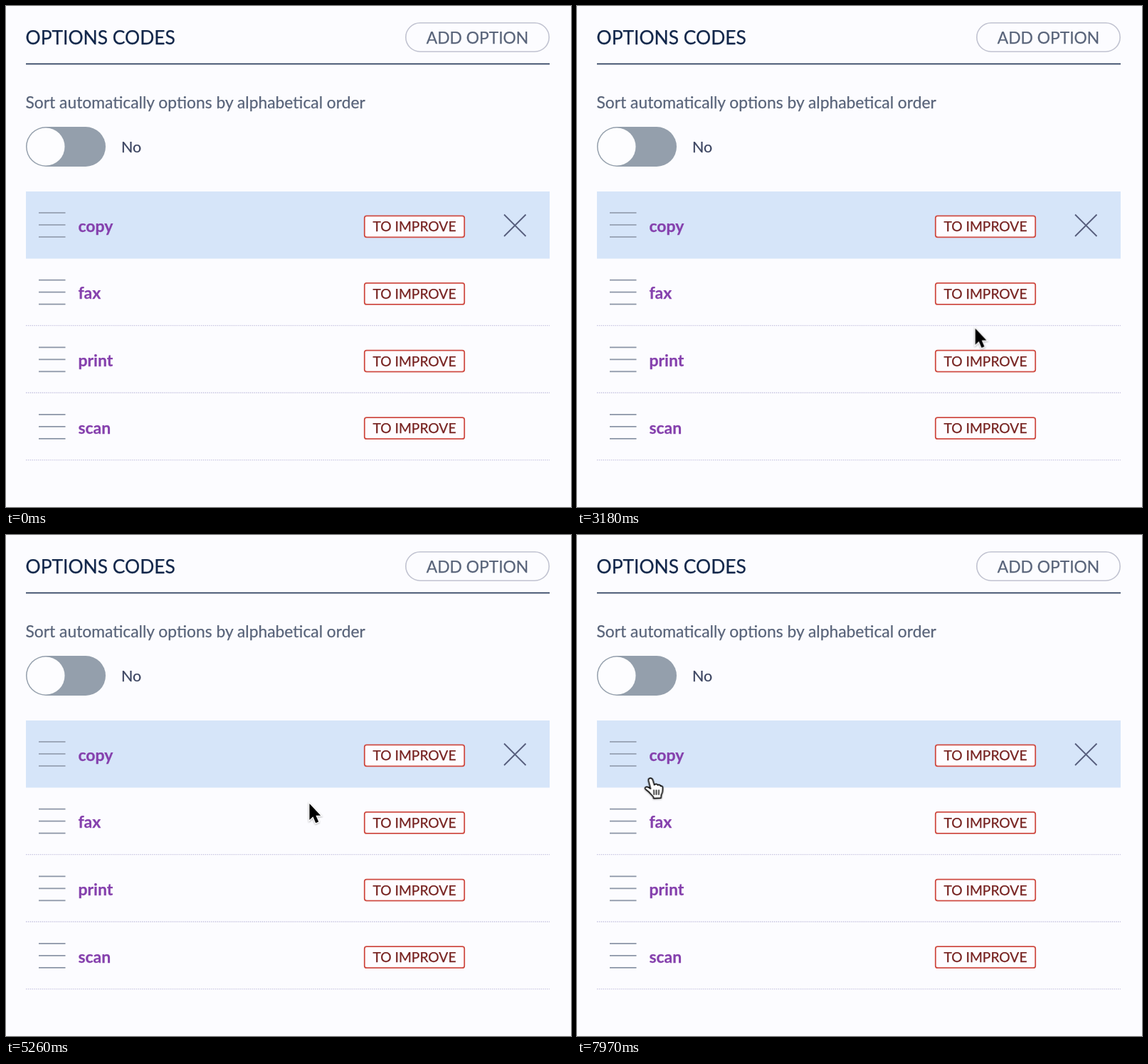
Recreate the animation shown at these times as an HTML page. Size 794 px wide and 705 px high, loop 7990 ms.

```html
<!DOCTYPE html>
<html lang="en">
<head>
<meta charset="utf-8">
<title>Options codes</title>
<style>
  html, body { margin: 0; width: 100%; height: 100%; overflow: hidden; background: #fcfcff; }
  svg { display: block; font-family: Lato, Carlito, sans-serif; }
  text { fill: currentColor; stroke: currentColor; stroke-width: .25; }
  .title { font-size: 26.4px; color: #11264a; }
  .label { font-size: 22.83px; color: #59647a; }
  .state { font-size: 21.4px; color: #3d4662; }
  .code { font-size: 23px; font-weight: 700; color: #8540ad; }
  .badge { font-size: 19.25px; color: #76211f; }
  .grip { stroke: #8b95a6; stroke-width: 1.7; }
  .cross { stroke: #565d7c; stroke-width: 1.8; }
  .rule { stroke: #c6c3e0; stroke-width: 1.4; stroke-dasharray: 1.43; }

  .cursor, .hover, .arrow, .hand { animation: 7990ms infinite; }
  .cursor { animation-name: travel; animation-timing-function: linear;
            filter: drop-shadow(0 1px 1px rgba(0, 0, 0, .3)); }
  .hover, .arrow, .hand { visibility: hidden; animation-timing-function: step-end; }
  .hover { animation-name: hover; }
  .arrow { animation-name: arrow; }
  .hand { animation-name: hand; }

  @keyframes travel {
    0%, 35% { transform: translate(578px, 463px); }
    47.06% { transform: translate(531px, 437px); }
    65.83% { transform: translate(426px, 377px); }
    79.22% { transform: translate(334px, 372px); }
    90.99% { transform: translate(236px, 367px); }
    99.75%, 100% { transform: translate(103.5px, 343px); }
  }
  @keyframes arrow {
    0% { visibility: hidden; }
    35% { visibility: visible; }
    75.7%, 100% { visibility: hidden; }
  }
  @keyframes hand {
    0% { visibility: hidden; }
    75.7%, 100% { visibility: visible; }
  }
  @keyframes hover {
    0% { visibility: hidden; }
    75.7% { visibility: visible; }
    96.6%, 100% { visibility: hidden; }
  }
</style>
</head>
<body>
<svg width="794" height="705" viewBox="0 0 794 705">
  <defs>
    <g id="row">
      <path class="grip" d="M46 30H83.500M46 47H83.500M46 64H83.500"/>
      <rect x="503.800" y="34.300" width="140.400" height="30" rx="3" fill="#fefcff" stroke="#cf4c43" stroke-width="1.800"/>
      <text class="badge" x="574" y="56.300" text-anchor="middle">TO IMPROVE</text>
    </g>
    <path id="cross" class="cross" d="M700 32.500L730.500 63M730.500 32.500L700 63"/>
    <path id="rule" class="rule" d="M28 94H764"/>
  </defs>

  <text class="title" x="27.500" y="54">OPTIONS CODES</text>
  <rect x="561.800" y="23.800" width="201.400" height="40.400" rx="20.200" fill="none" stroke="#c1c3d1" stroke-width="1.600"/>
  <text class="label" x="662.500" y="52.500" text-anchor="middle">ADD OPTION</text>
  <path d="M28 81.500H764" stroke="#14284b" stroke-width="1.700"/>

  <text class="label" x="27.500" y="144">Sort automatically options by alphabetical order</text>
  <rect x="28" y="170" width="112" height="56" rx="28" fill="#949fac"/>
  <circle cx="56" cy="198" r="26.500" fill="#fdfdff"/>
  <text class="state" x="162" y="205.500">No</text>

  <g transform="translate(0 261)">
    <rect x="28" width="736" height="94.500" fill="#d6e5f9"/>
    <use href="#row"/>
    <use href="#cross"/>
    <text class="code" x="101.400" y="56.800">copy</text>
  </g>
  <g transform="translate(0 355.600)">
    <g class="hover">
      <rect x="28" width="736" height="94" fill="#f8f7fe"/>
      <use href="#cross"/>
    </g>
    <use href="#row"/>
    <use href="#rule"/>
    <text class="code" x="101.400" y="56.800">fax</text>
  </g>
  <g transform="translate(0 450.300)">
    <use href="#row"/>
    <use href="#rule"/>
    <text class="code" x="101.400" y="56.800">print</text>
  </g>
  <g transform="translate(0 544.900)">
    <use href="#row"/>
    <use href="#rule"/>
    <text class="code" x="101.400" y="56.800">scan</text>
  </g>

  <g class="cursor">
    <path class="arrow" d="M.5 1V24L5.500 19.200L9.300 28.300L13.300 26.600L9.500 17.700H16.300Z"
      stroke="#fff" stroke-width="2.600" paint-order="stroke"/>
    <g class="hand" transform="translate(-9.200 -2) scale(1.030)" stroke="#111" stroke-linecap="round" stroke-linejoin="round">
      <path fill="#fff" stroke-width="1.700" d="M6 4.500C5.500 .5 10.500 0 11.800 3.500L14 10.500C15.500 8.500 18 8.800 18.600 10.700C20 9.700 22 10 22.500 12C24 11.300 25.300 12.300 25.400 14C25.700 18 25.300 21 23.500 24L23 28.300L13 28.800L12.500 26.500C10 24 7 19.800 2.500 16.800C.3 15.300 1.500 12.700 4 13C6 13.200 7.500 14.500 8.800 15.600Z"/>
      <path fill="none" stroke-width="1.500" d="M13.300 17.500L13.500 23.500M16.700 17.500V23.500M20.100 17.500L20 23.500"/>
    </g>
  </g>
</svg>
</body>
</html>
```
